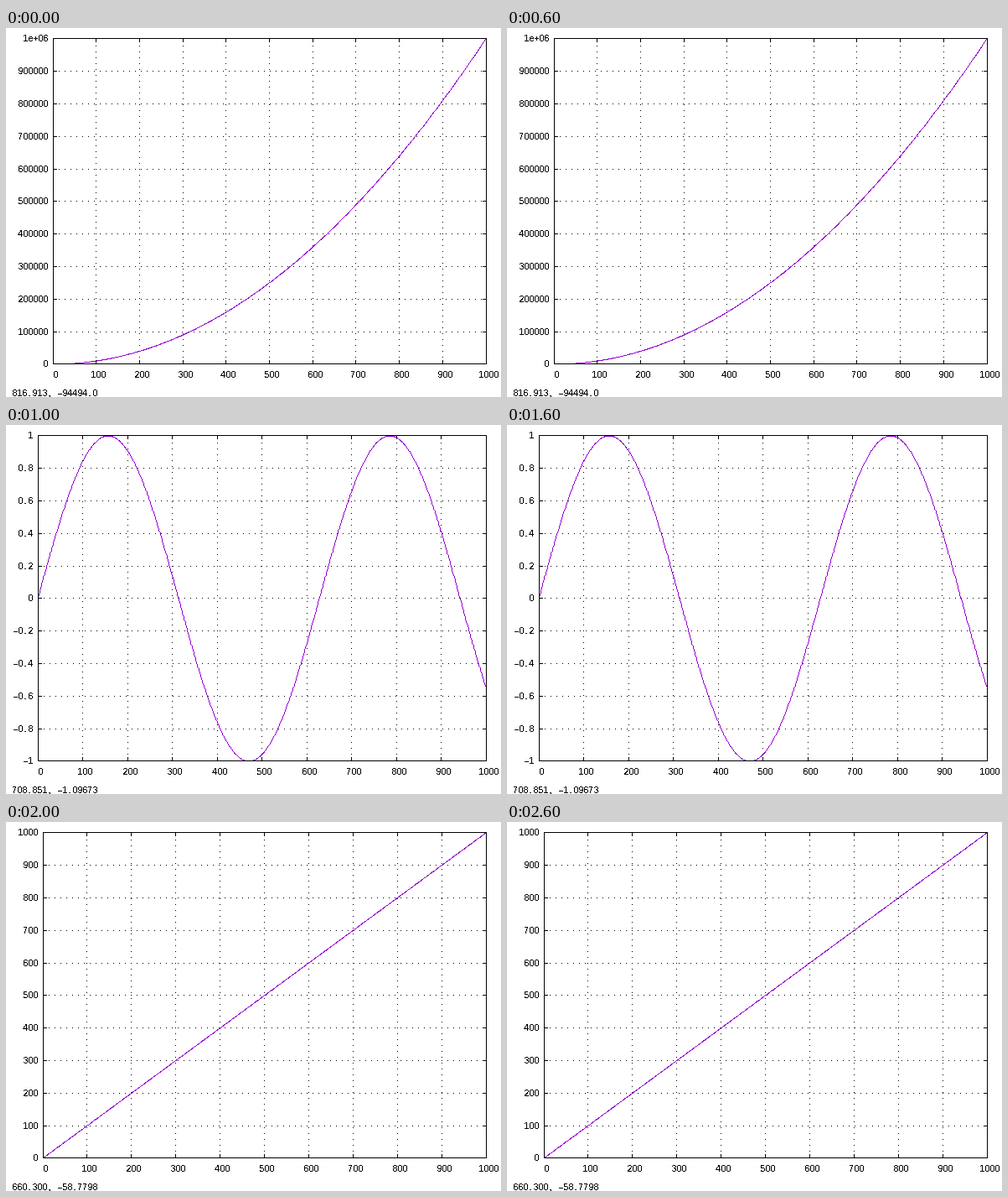
Write a matplotlib script that moves like this. It is 591 px wide and 440 px high and loops after 3000 ms.

```python
import numpy as np
import matplotlib.pyplot as plt
from matplotlib.animation import ArtistAnimation

W, H, DPI = 591, 440, 64
TOP, BOTTOM, RIGHT = 12, 400, 573
CELL = 6            # character pitch
TICK = 4
BLACK, VIOLET = (0, 0, 0), (0x94, 0, 0xD3)

plt.rcParams.update({
    "font.family": "Liberation Sans",
    "font.size": 11 * 72 / DPI,
    "text.hinting": "force_autohint",
    "text.hinting_factor": 1,
    "text.antialiased": False,
})

fig = plt.figure(figsize=(W / DPI, H / DPI), dpi=DPI, facecolor="white")
ax = fig.add_axes([0, 0, 1, 1])
ax.axis("off")


def to_col(u, left):
    """Map 0..1 to a pixel column, rounding to the left."""
    return np.floor(left + np.asarray(u) * (RIGHT - left) + 1e-6).astype(int)


def to_row(v):
    """Map 0..1 to a pixel row, rounding down the screen."""
    return np.ceil(BOTTOM - np.asarray(v) * (BOTTOM - TOP) - 1e-6).astype(int)


def polyline(img, xs, ys, color):
    """Draw a one pixel wide line without smoothing."""
    for x0, y0, x1, y1 in zip(xs, ys, xs[1:], ys[1:]):
        n = max(abs(x1 - x0), abs(y1 - y0)) + 1
        rows = np.rint(np.linspace(y0, y1, n)).astype(int)
        cols = np.rint(np.linspace(x0, x1, n)).astype(int)
        img[rows, cols] = color


def label(x, base, s):
    """Set text in fixed cells, starting at x, standing on row base."""
    out = []
    for i, ch in enumerate(s):
        dot = ch in ".,"
        if ch != " ":
            out.append(ax.text(x + i * CELL + dot, base + 1,
                               ch.replace("-", "\u2212"),
                               weight="bold" if dot else "normal",
                               ha="left", va="baseline", color="black"))
    return out


def plot(func, left, lo, hi, ylabels, status):
    img = np.full((H, W, 3), 255, np.uint8)
    xticks = to_col(np.linspace(0, 1, 11), left)
    yticks = to_row(np.linspace(0, 1, len(ylabels)))

    # dotted grid
    for y in yticks:
        img[y, left:RIGHT:7] = BLACK
    for x in xticks:
        img[BOTTOM - 1:TOP:-7, x] = BLACK

    # ticks on all four sides
    for y in yticks:
        img[y, left:left + TICK + 1] = BLACK
        img[y, RIGHT - TICK:RIGHT + 1] = BLACK
    for x in xticks:
        img[TOP:TOP + TICK + 1, x] = BLACK
        img[BOTTOM - TICK:BOTTOM + 1, x] = BLACK

    t = np.arange(1001)
    polyline(img, to_col(t / 1000, left), to_row((func(t) - lo) / (hi - lo)),
             VIOLET)
    polyline(img, [left, RIGHT, RIGHT, left, left],
             [TOP, TOP, BOTTOM, BOTTOM, TOP], BLACK)

    artists = [ax.imshow(img, extent=(0, W, H, 0), interpolation="nearest",
                         aspect="auto")]
    for y, s in zip(yticks, ylabels):
        artists += label(left - 6 - CELL * len(s), y + 3, s)
    for i, x in enumerate(xticks):
        s = str(100 * i)
        artists += label(x + 3 - CELL * len(s) // 2, 416, s)
    return artists + label(7, 438, status)


hundreds = [str(100 * i) for i in range(11)]
thousands = ["0"] + [f"{i}00000" for i in range(1, 10)] + ["1e+06"]
fifths = [f"{i / 5:g}" for i in range(-5, 6)]

scenes = [
    plot(lambda t: t ** 2, 56, 0, 1e6, thousands, "816.913, -94494.0"),
    plot(lambda t: np.sin(t / 100), 38, -1, 1, fifths, "708.851, -1.09673"),
    plot(lambda t: t, 44, 0, 1000, hundreds, "660.300, -58.7798"),
]
ax.set_xlim(0, W)
ax.set_ylim(H, 0)

anim = ArtistAnimation(fig, scenes, interval=1000, repeat=True, repeat_delay=0)
plt.show()
```
